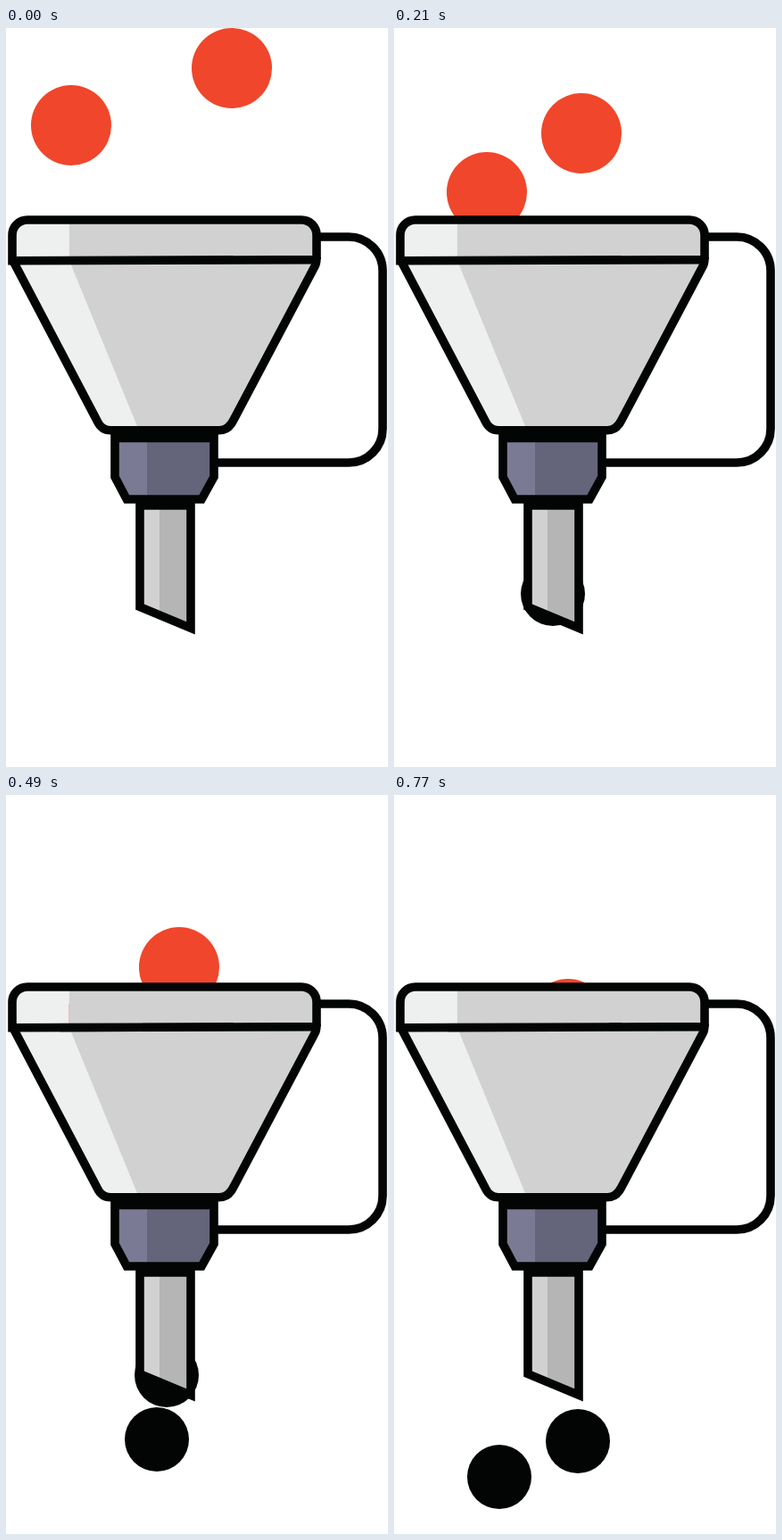
An HTML page that plays this animation: 428 px wide and 828 px high, repeating every 0.84 s.

```html
<!DOCTYPE html>
<html lang="en">
<head>
<meta charset="utf-8">
<title>Funnel</title>
<style>
  html, body { margin: 0; width: 100%; height: 100%; overflow: hidden; background: #fff; }
  svg { display: block; }
  .line { fill: none; stroke: #030504; stroke-width: 9.6; }
  .red { fill: #f0462b; }
  .black { fill: #030504; }
</style>
</head>
<body>
<svg width="428" height="828" viewBox="0 0 428 828">
  <g id="balls"></g>

  <path class="line" d="M348 234H384A38 38 0 0 1 422 272V449A38 38 0 0 1 384 487H236"/>

  <!-- spout -->
  <path fill="#d1d1d1" d="M150 535H172V658L150 649Z"/>
  <path fill="#b5b5b5" d="M172 535H207V672L172 658Z"/>
  <path class="line" d="M150 535H207V672.4L150 648.6Z"/>

  <!-- collar -->
  <path fill="#7b7a94" d="M122 459H158V528H135L122 503Z"/>
  <path fill="#64647a" d="M158 459H233V503L219 528H158Z"/>
  <path class="line" d="M122 459.5H233V503L219.2 528H135.2L122 503Z"/>

  <!-- cone -->
  <path fill="#d1d1d1" d="M8 262H348L254 441Q249 451 239 451H116Q107 451 102 441Z"/>
  <path fill="#eef0ef" d="M8 262H71.5L149 451H116Q107 451 102 441Z"/>
  <path class="line" d="M8.5 262L102 440Q107 450.8 117 450.8H239Q249 450.8 254.500 440L346.500 266Q348 263 348 257"/>

  <!-- rim -->
  <path fill="#d1d1d1" d="M70.500 215H331A17 17 0 0 1 348 232V260H70.500Z"/>
  <path fill="#eef0ef" d="M7 260V232A17 17 0 0 1 24 215H70.500V260Z"/>
  <path class="line" d="M348 259.600L7 260.800V232A17 17 0 0 1 24 215H331A17 17 0 0 1 348 232V259"/>
</svg>
<script>
const STEP = 70, STEPS = 12;

// Each key is [step, x, y]; a ball is hidden outside its keys.
const balls = [
  { type: 'red', r: 45, keys: [[0, 73, 109], [2, 101, 153], [4, 107, 215], [6, 107, 245], [8, 107, 275]] },
  { type: 'red', r: 45, keys: [[0, 253, 45], [2, 227, 97], [4, 193, 139], [6, 193, 167], [8, 195, 219], [11, 195, 251]] },
  { type: 'black', r: 36, keys: [[3, 178, 634], [4, 178, 654], [6, 178, 696], [8, 160, 748], [9, 130, 764], [11, 118, 764]] },
  { type: 'black', r: 36, keys: [[7, 180, 650], [8, 180, 662], [9, 182, 674], [11, 206, 724]] }
];

for (const ball of balls) {
  ball.node = document.createElementNS('http://www.w3.org/2000/svg', 'circle');
  ball.node.setAttribute('class', ball.type);
  ball.node.setAttribute('r', ball.r);
  document.getElementById('balls').append(ball.node);
}

function positionAt(keys, step) {
  const next = keys.findIndex(key => key[0] >= step);
  if (next < 0 || step < keys[0][0]) return null;
  const [t1, x1, y1] = keys[next];
  const [t0, x0, y0] = keys[Math.max(next - 1, 0)];
  const k = t1 > t0 ? (step - t0) / (t1 - t0) : 1;
  return [x0 + (x1 - x0) * k, y0 + (y1 - y0) * k];
}

function draw() {
  const step = Math.floor(performance.now() / STEP) % STEPS;
  for (const { node, keys } of balls) {
    const position = positionAt(keys, step);
    node.style.display = position ? '' : 'none';
    if (position) {
      node.setAttribute('cx', position[0]);
      node.setAttribute('cy', position[1]);
    }
  }
  requestAnimationFrame(draw);
}
draw();
</script>
</body>
</html>
```
